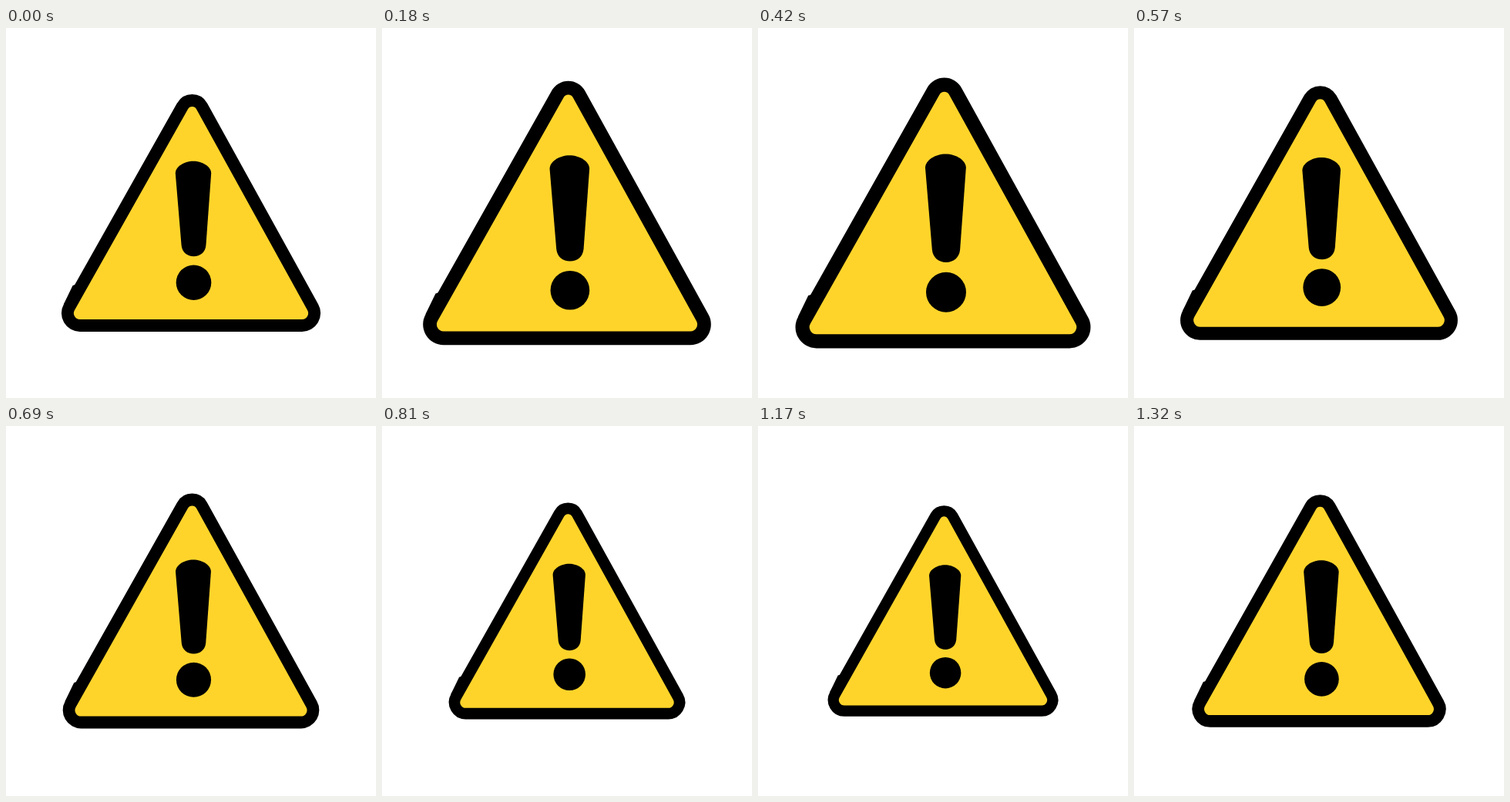
Write an HTML page that moves like this. It is 480x480 px and loops after 1350 ms.

```html
<!DOCTYPE html>
<html lang="en">
<head>
<meta charset="utf-8">
<title>Warning sign</title>
<style>
  @property --phase {
    syntax: "<angle>";
    inherits: false;
    initial-value: 0deg;
  }
  html, body {
    margin: 0;
    width: 100%;
    height: 100%;
    overflow: hidden;
    background: #fff;
  }
  svg {
    display: block;
    width: 100%;
    height: 100%;
  }
  /* One sine pulse per loop, in 30 ms steps */
  .sign {
    transform-origin: 240px 240px;
    transform: scale(calc(1 + 0.15 * sin(var(--phase))));
    animation: pulse 1350ms steps(45) infinite;
  }
  .plate {
    fill: #ffd42a;
    stroke: #000;
    stroke-width: 32;
    paint-order: stroke;
  }
  @keyframes pulse {
    from { --phase: 0deg; }
    to { --phase: 360deg; }
  }
</style>
</head>
<body>
<svg viewBox="0 0 480 480">
  <g class="sign">
    <path d="M90 333 L86.6 334 L74.8 358.4 L90 358Z"/>
    <path class="plate" d="M236 105.2 A6.3 6.3 0 0 1 247 105.2 L391 366 A8 8 0 0 1 384 378 H96 A8 8 0 0 1 89 366Z"/>
    <path d="M219.8 188.5 C219.8 180 231 172.8 243 172.8 S266.2 180 266.2 188.5 L259.4 282 C258.5 291 252 296.2 243.5 296.2 S228.5 291 227.6 282Z"/>
    <circle cx="243.5" cy="330.2" r="22.8"/>
  </g>
</svg>
</body>
</html>
```
